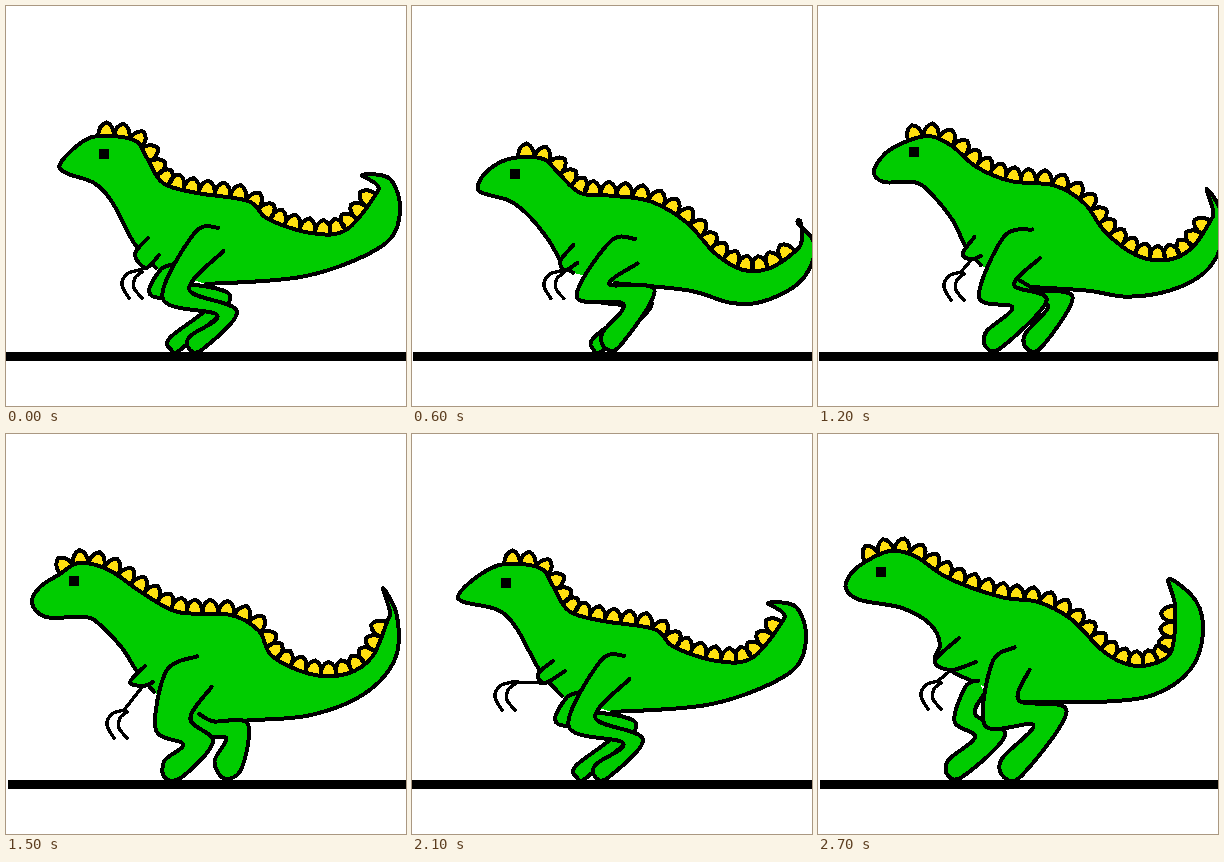
An HTML page that plays this animation: 400x400 px, repeating every 3000 ms.

```html
<!DOCTYPE html>
<html lang="en">
<head>
<meta charset="utf-8">
<title>Running dinosaur</title>
<style>
html, body { margin: 0; width: 100%; height: 100%; overflow: hidden; background: #fff; }
svg { display: block; width: 100vw; height: 100vh; }
path { fill: #00cc00; stroke: #000; stroke-width: 4; stroke-linecap: round; stroke-linejoin: round; }
#spikes { fill: #ffe010; }
#back, #hand { fill: none; }
#hand { stroke-width: 3.4; }
</style>
</head>
<body>
<svg viewBox="0 0 400 400" shape-rendering="crispEdges">
  <rect id="ground" y="346" width="400" height="9"/>
  <path id="back"/>
  <path id="spikes"/>
  <path id="body"/>
  <path id="far"/>
  <path id="near"/>
  <path id="arm"/>
  <path id="hand"/>
  <rect id="eye" width="10" height="10"/>
</svg>
<script>
const STEP = 300, FLOOR = 346, SPIKE_GAP = 16, SPIKE_HEIGHT = 14;

const points = text => text.split(' ').map(p => p.split(',').map(Number));

// Key points: chest to brow, brow to tail, tail tip to belly;
// leg joints are hip, knee, ankle and toe, each with a radius.
function makePose(ground, head, back, tail, near, far, arm, wrist, eye) {
  const parts = { head, back, tail, near, far, arm, wrist, eye };
  for (const name in parts) parts[name] = points(parts[name]);
  return { ground, parts };
}

const crouch = makePose(0,
  '150,262 128,237 106,196 88,177 60,167 54,158 72,139 92,130',
  '92,130 128,134 141,152 157,177 191,187 242,195 262,213 305,227 340,224 370,188',
  '370,178 356,169 384,173 394,206 376,240 300,270 200,278',
  '203,236,17 170,288,14 221,307,10 190,337,9',
  '163,268,10 158,283,14 214,294,11 170,337,8',
  '142,232 129,248 140,262 153,249', '133,264', '93,143');

const stretch = makePose(1,
  '150,264 138,254 122,232 98,207 78,196 55,191 48,183 57,165 74,154 92,151',
  '92,151 119,153 136,171 162,190 196,190 245,193 277,222 310,248 340,251 368,236',
  '380,222 382,203 365,192 391,202 398,225 388,257 350,286 322,292 275,281 204,276',
  '205,244,17 178,283,16 229,290,14 220,333,12',
  '165,266,10 162,280,14 207,300,12 171,336,9',
  '155,236 138,252 142,264 158,252', '136,265', '82,165');

const lunge = makePose(1,
  '156,268 144,256 132,227 112,200 93,184 70,184 64,177 80,158 104,148',
  '104,148 131,150 145,164 167,187 206,187 242,197 277,227 302,262 328,277 355,274 382,253',
  '384,243 378,223 395,246 396,275 378,297 345,306 305,304 272,288 186,277',
  '203,247,18 168,285,19 209,291,20 163,333,10',
  '185,282,8 205,292,8 232,300,13 187,339,7',
  '152,240 143,256 148,263 157,260', '146,263', '97,157');

const stand = makePose(2,
  '148,258 130,236 116,214 92,189 78,183 40,183 26,169 34,153 54,140',
  '54,140 73,129 103,136 135,158 172,178 225,181 253,197 266,222 304,240 340,240 366,223 381,188',
  '384,178 377,154 391,182 389,225 358,260 305,281 250,286 186,289',
  '183,245,24 167,290,18 192,309,15 167,335,12',
  '190,285,6 205,295,8 231,297,13 222,331,14',
  '139,232 124,248 137,252 147,248', '118,276', '63,142');

const dive = makePose(2,
  '170,252 140,228 131,209 100,189 78,179 52,178 40,165 50,145 67,132',
  '67,132 91,125 122,134 140,149 163,166 211,169 245,177 281,205 309,256 330,286 352,299 381,304',
  '394,296 400,283 396,306 378,322 340,331 300,316 268,285 240,268 215,270',
  '194,228,20 191,283,22 249,290,17 214,336,11',
  '168,258,9 168,268,12 192,302,11 183,325,10',
  '143,203 126,222 135,228 167,220', '140,236', '68,141');

const rise = makePose(2,
  '160,250 135,238 117,226 122,210 112,190 84,174 42,166 28,155 32,141 47,128',
  '47,128 72,117 97,122 130,144 183,163 220,168 253,185 285,217 312,231 338,229 354,215 357,172',
  '351,145 378,167 385,200 372,236 335,261 280,268 205,268',
  '193,232,19 184,279,21 232,284,18 194,333,13',
  '157,256,10 147,284,11 172,302,15 138,334,11',
  '141,204 117,227 133,236 158,228', '120,247', '58,133');

const reach = {
  ground: 0,
  parts: {
    ...crouch.parts,
    head: points('150,262 128,237 105,195 86,176 52,168 47,160 66,142 92,130'),
    arm: points('141,227 126,240 133,249 153,237'),
    wrist: points('100,248'),
    eye: points('89,144')
  }
};

// Point at fraction u of a list
function pointAt(pts, u) {
  const x = u * (pts.length - 1), i = Math.floor(x);
  const next = pts[Math.min(i + 1, pts.length - 1)];
  return pts[i].map((v, k) => v + (next[k] - v) * (x - i));
}

// Halfway pose, moved by dx; the lift fades out towards the floor
function between(a, b, dx, lift) {
  const parts = {};
  for (const name in a.parts) {
    const p = a.parts[name], q = b.parts[name];
    const n = Math.max(p.length, q.length);
    parts[name] = Array.from({ length: n }, (_, i) => {
      const u = n > 1 ? i / (n - 1) : 0;
      const end = pointAt(q, u);
      const [x, y, ...r] = pointAt(p, u).map((v, k) => (v + end[k]) / 2);
      return [x + dx, y - lift * (FLOOR - y) / 220, ...r];
    });
  }
  return { ground: 1, parts };
}

const poses = [
  crouch, stretch, between(stretch, lunge, 8, -2), lunge, between(lunge, stand, 11, 10),
  stand, between(stand, reach, 0, -3), reach, dive, rise
];

const xy = (x, y) => x.toFixed(1) + ' ' + y.toFixed(1);

// Smooth curve through all points
function curve(pts) {
  let d = 'M' + xy(...pts[0]);
  for (let i = 0; i < pts.length - 1; i++) {
    const b = pts[i], c = pts[i + 1];
    const a = pts[i - 1] || b, e = pts[i + 2] || c;
    d += 'C' + xy(b[0] + (c[0] - a[0]) / 6, b[1] + (c[1] - a[1]) / 6)
      + ',' + xy(c[0] - (e[0] - b[0]) / 6, c[1] - (e[1] - b[1]) / 6) + ',' + xy(...c);
  }
  return d;
}

function direction(a, b) {
  const dx = b[0] - a[0], dy = b[1] - a[1], len = Math.hypot(dx, dy) || 1;
  return [dx / len, dy / len];
}

// Outline around leg joints: over the hip, down the front, round the toe, up the back
function leg(joints) {
  const last = joints.length - 1, front = [], rear = [];
  const dirs = joints.slice(1).map((p, i) => direction(joints[i], p));
  joints.forEach(([x, y, r], i) => {
    const a = dirs[Math.max(i - 1, 0)], b = dirs[Math.min(i, last - 1)];
    const [dx, dy] = direction([0, 0], [a[0] + b[0], a[1] + b[1]]);
    if (i === 0) front.push([x - dx * r, y - dy * r]);
    front.push([x - dy * r, y + dx * r]);
    rear.unshift([x + dy * r, y - dx * r]);
    if (i === last) front.push([x + dx * r, y + dy * r]);
  });
  return curve([...front, ...rear]);
}

// Evenly spaced pointed domes along a path
function spikes(path) {
  const length = path.getTotalLength(), n = Math.round(length / SPIKE_GAP);
  let d = '';
  for (let i = 0; i < n; i++) {
    const a = path.getPointAtLength(length * i / n);
    const b = path.getPointAtLength(length * (i + 1) / n);
    const [dx, dy] = direction([a.x, a.y], [b.x, b.y]);
    const nx = dy * SPIKE_HEIGHT, ny = -dx * SPIKE_HEIGHT;
    d += 'M' + xy(a.x, a.y) + 'Q' + xy(a.x + nx * 0.8, a.y + ny * 0.8)
      + ',' + xy((a.x + b.x) / 2 + nx, (a.y + b.y) / 2 + ny)
      + 'Q' + xy(b.x + nx * 0.8, b.y + ny * 0.8) + ',' + xy(b.x, b.y);
  }
  return d;
}

const CLAWS = [points('0,0 -12,4 -17,15 -10,28'), points('3,2 -4,8 -5,18 3,28')];

function hand(elbow, wrist) {
  const claws = CLAWS.map(c => curve(c.map(([x, y]) => [wrist[0] + x, wrist[1] + y])));
  return curve([elbow, wrist]) + claws.join('');
}

const el = id => document.getElementById(id);
const setPath = (id, d) => el(id).setAttribute('d', d);

function draw({ ground, parts }) {
  const { head, back, tail, near, far, arm, wrist, eye } = parts;
  el('ground').setAttribute('x', ground);
  setPath('back', curve(back));
  setPath('spikes', spikes(el('back')));
  setPath('body', curve([...head, ...back.slice(1), ...tail]));
  setPath('far', leg(far));
  setPath('near', leg(near));
  setPath('arm', curve(arm));
  setPath('hand', hand(arm[2], wrist[0]));
  el('eye').setAttribute('x', eye[0][0]);
  el('eye').setAttribute('y', eye[0][1]);
}

const start = performance.now();
let shown = -1;

function tick(now) {
  const i = Math.floor(Math.max(0, now - start) / STEP) % poses.length;
  if (i !== shown) draw(poses[shown = i]);
  requestAnimationFrame(tick);
}
tick(start);
</script>
</body>
</html>
```
